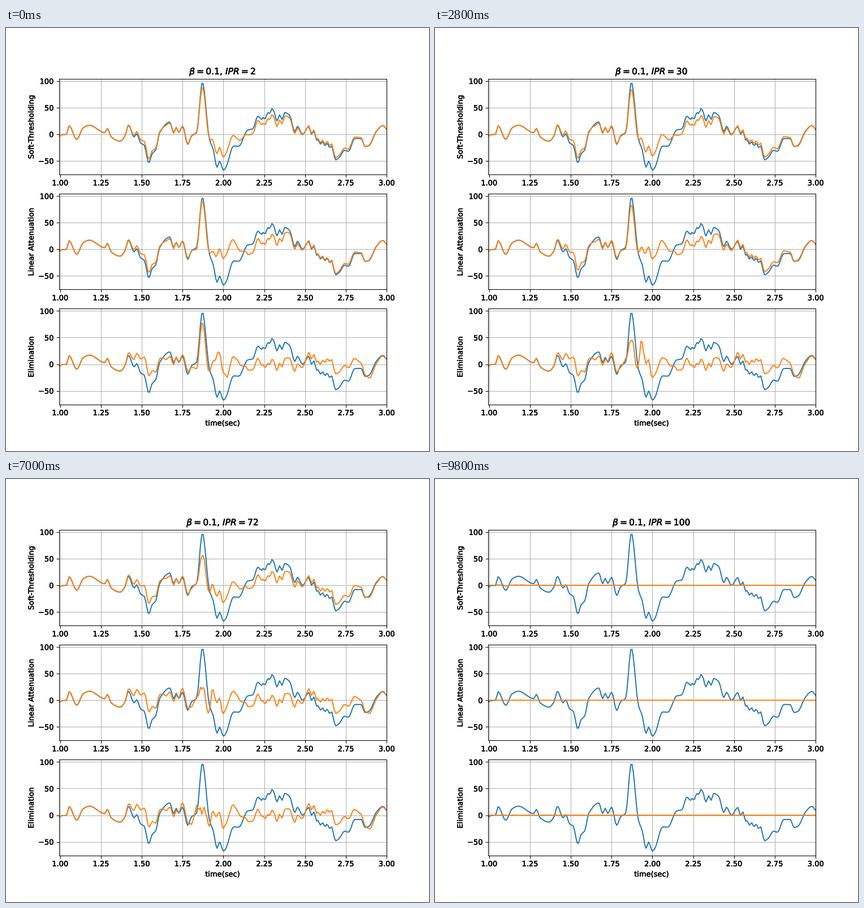
Write a matplotlib script that moves like this. It is 748 px wide and 748 px high and loops after 10000 ms.

```python
import numpy as np
import matplotlib.pyplot as plt
from matplotlib.animation import FuncAnimation
from matplotlib.patheffects import withStroke
from matplotlib.text import Text

RATE = WIN = 128
HOP = WIN // 2
LEVELS = 4
BETA = 0.1
K2 = 100
FRAMES = 50

# Daubechies-3 wavelet pair
LO = np.array([0.33267055, 0.80689151, 0.45987750,
               -0.13501102, -0.08544127, 0.03522629])
HI = LO[::-1] * (-1.0) ** np.arange(6)

n = np.arange(-1, 2 * RATE + 1)      # sample number, 0 is at 1 s
t = 1 + n / RATE

# main turning points of the recording: (sample, microvolt)
KEYS = [
    (-1, -5), (1, -1), (5, 0), (7, 16), (13, -9.5), (18, 12), (23, 17),
    (35, 3), (37, 11), (40, -5), (47, -13), (51, -2), (53.5, 17), (58, -5),
    (60, 1), (63, -16), (66, -21), (69.5, -54), (72, -37), (75, -29), (78, 3),
    (86, 23), (89, 3), (91, 13), (93, 3.5), (96, 15), (100, -19), (103, -3),
    (107, 4), (111.5, 98), (117, -9), (120, -29), (123, -62), (125, -50.5),
    (128, -67.5), (130, -62), (136, -22), (140, -22.5), (147, 8), (151, 10),
    (155, 34), (158, 28), (167, 46), (170, 25), (172, 36.5), (174, 28),
    (176, 41), (180, 35), (184, 5), (186, 15), (190, 0), (195, 14.5),
    (197, 0), (199, 6), (201, -11), (213, -25), (216, -48), (219, -43),
    (223, -30), (226, -32), (231, -8), (236, -8), (239, -23), (242, -21),
    (248, 6), (253, 16.5), (256, 9)]


def curve(points):
    """Monotone cubic through the points, sampled at n."""
    x, y = np.array(points, float).T
    h = np.diff(x)
    d = np.diff(y) / h
    m = np.zeros_like(y)
    same = d[:-1] * d[1:] > 0
    a, b = d[:-1][same], d[1:][same]
    m[1:-1][same] = 2 * a * b / (a + b)
    m[0], m[-1] = d[0], d[-1]
    i = np.clip(np.searchsorted(x, n, side="right") - 1, 0, len(h) - 1)
    s = (n - x[i]) / h[i]
    return ((1 + 2 * s) * (1 - s) ** 2 * y[i] + s * (1 - s) ** 2 * h[i] * m[i]
            + s * s * (3 - 2 * s) * y[i + 1] + s * s * (s - 1) * h[i] * m[i + 1])


def ripple(lo, hi):
    return 3 * np.cos(2 * np.pi * (n - 213) / 3.6) * ((n > lo) & (n < hi))


def down(x, f):
    return np.convolve(np.pad(x, 5, mode="symmetric"), f[::-1], "valid")[1::2]


def up(c, f):
    wide = np.zeros(2 * len(c))
    wide[::2] = c
    return np.convolve(wide, f)[4:2 * len(c)]


def split(x, level=LEVELS):
    """Leaves of the wavelet packet tree."""
    if level == 0:
        return [x]
    return split(down(x, LO), level - 1) + split(down(x, HI), level - 1)


def merge(leaves, size=WIN):
    if len(leaves) == 1:
        return leaves[0]
    half, sub = len(leaves) // 2, (size + 5) // 2
    low, high = merge(leaves[:half], sub), merge(leaves[half:], sub)
    return (up(low, LO) + up(high, HI))[:size]


def soft(w, theta):
    knee = 0.8 * theta
    bent = theta * np.tanh(np.arctanh(0.8) * w / knee)
    return np.where(np.abs(w) <= knee, w, bent)


def linear(w, theta):
    fall = np.sign(w) * np.clip(2 * theta - np.abs(w), 0, None)
    return np.where(np.abs(w) <= theta, w, fall)


def eliminate(w, theta):
    return np.where(np.abs(w) <= theta, w, 0)


signal = curve(KEYS) + ripple(158, 167) + ripple(201, 214)
padded = np.pad(signal, HOP - 1, mode="reflect")
starts = range(0, len(padded) - WIN + 1, HOP)
packets = [np.array(split(padded[s:s + WIN])) for s in starts]
weight = np.sin(np.pi * (np.arange(WIN) + 0.5) / WIN) ** 2


def clean(ipr, rule):
    """Limit wavelet coefficients window by window, then overlap and add."""
    out = np.zeros(len(padded))
    for s, w in zip(starts, packets):
        spread = np.ptp(np.percentile(w, [50 - ipr / 2, 50 + ipr / 2]))
        theta = K2 * np.exp(-BETA * spread / 2)
        out[s:s + WIN] += weight * merge(rule(w, theta))
    return out[HOP - 1:HOP - 1 + len(n)]


fig, axes = plt.subplots(3, 1, figsize=(8, 8), dpi=93.5)
rules = {"Soft-Thresholding": soft, "Linear Attenuation": linear,
         "Elimination": eliminate}
lines = []
for ax, name in zip(axes, rules):
    ax.plot(t, signal, color="#1f77b4", lw=1.5)
    lines += ax.plot(t, signal, color="#ff7f0e", lw=1.5)
    ax.set_xlim(t[0], t[-1])
    ax.set_ylim(-75.7, 104.4)
    ax.set_xticks(np.arange(1, 3.1, 0.25))
    ax.set_yticks([-50, 0, 50, 100])
    ax.set_ylabel(name)
    ax.grid(True)
axes[-1].set_xlabel("time(sec)")
title = axes[0].set_title("")
for label in fig.findobj(Text):
    label.set_path_effects([withStroke(linewidth=0.4, foreground="black")])


def update(i):
    ipr = 2 * (i + 1)
    for line, rule in zip(lines, rules.values()):
        line.set_ydata(clean(ipr, rule))
    title.set_text(rf"$\beta={BETA}$, $IPR={ipr}$")
    return [*lines, title]


anim = FuncAnimation(fig, update, frames=FRAMES, interval=200,
                     init_func=lambda: update(0), repeat=True, repeat_delay=0)
plt.show()
```
